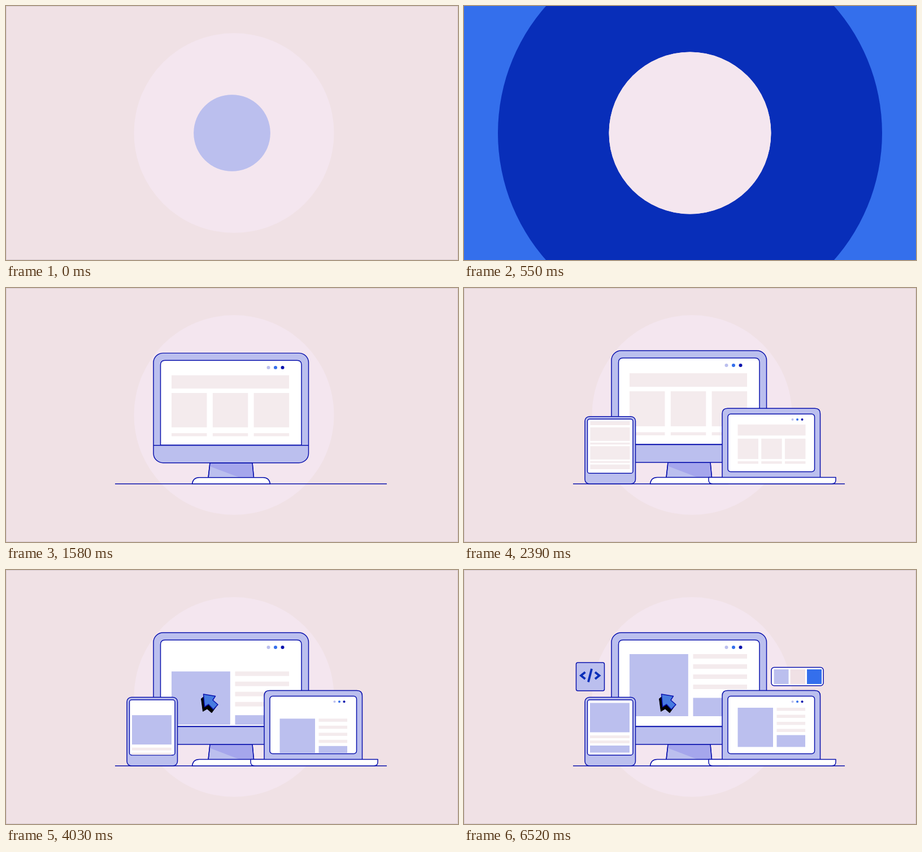
An HTML page for the animation above (6.55 s loop, 800x450 px).

```html
<!DOCTYPE html>
<html lang="en">
<head>
<meta charset="utf-8">
<title>Responsive design</title>
<style>
  html, body { margin: 0; width: 100%; height: 100%; overflow: hidden; background: #f0e1e5; }
  svg { display: block; width: 100vw; height: 100vh; }
  .line { stroke: #0a12ad; stroke-width: 1.5; stroke-linejoin: round; }
  .lilac { fill: #bbbfee; }
  .blue { fill: #346fec; }
  .navy { fill: #0a12ad; }
  .white { fill: #fff; }
  .wire { fill: #f4ebed; }
  .pink { fill: #f0e1e5; }
  .none { fill: none; }
</style>
</head>
<body>
<svg viewBox="0 0 800 450" xmlns="http://www.w3.org/2000/svg">
  <defs>
    <g id="backdrop">
      <rect class="pink" width="800" height="450"/>
      <rect x=".5" y=".5" width="799" height="449" fill="none" stroke="#d9cbd0"/>
      <circle cx="403.5" cy="225" r="177" fill="#f4e6ef"/>
    </g>
    <clipPath id="iris"><circle id="irisCircle" cx="400" cy="225"/></clipPath>
    <clipPath id="monitorClip"><rect x="274" y="125" width="248.500" height="149"/></clipPath>
    <clipPath id="laptopClip"><rect x="468" y="224" width="152" height="101" rx="4"/></clipPath>
    <clipPath id="phoneClip"><rect x="219" y="231" width="79.500" height="96.500" rx="3"/></clipPath>
  </defs>

  <use href="#backdrop"/>
  <circle class="wave lilac" cx="400" cy="225"/>
  <circle class="wave blue" cx="400" cy="225"/>
  <circle class="wave" cx="400" cy="225" fill="#082eb9"/>

  <g clip-path="url(#iris)">
    <use href="#backdrop"/>
    <path id="ground" class="line"/>

    <g id="code">
      <rect class="line lilac" x="198.500" y="164" width="50" height="50" rx="3"/>
      <path d="M214.500 181L207 187L214.500 193M232 181L239.500 187L232 193M226 175L220 198.500"
        fill="none" stroke="#082eb9" stroke-width="3.800"/>
    </g>

    <g id="palette">
      <rect class="line white" x="544" y="172.500" width="92" height="32.500" rx="5"/>
      <rect class="lilac" x="548.500" y="176" width="26" height="26"/>
      <rect class="pink" x="577.500" y="176" width="26.500" height="26"/>
      <rect class="blue" x="607" y="176" width="26" height="26"/>
    </g>

    <g id="monitor">
      <path class="line lilac" d="M361 309H436L438.500 336H358Z"/>
      <path d="M361 309.700H435.500L438 335H412L361 315.500Z" fill="#a5a6ec"/>
      <path class="line none" d="M361 309H436L438.500 336H358Z"/>
      <path class="line white" d="M329.500 347Q331 335.500 342 335.500H455Q466 335.500 467.500 347Z"/>
      <rect class="line lilac" x="261" y="111" width="274.500" height="198" rx="17"/>
      <path class="line white" d="M273.500 277V132Q273.500 124 281.500 124H515Q523 124 523 132V277Z"/>
      <path class="line" d="M261 277.500H535.500"/>
      <g class="screen" clip-path="url(#monitorClip)"><g class="before"></g><g class="after"></g></g>
      <circle class="lilac" cx="464.500" cy="137" r="3"/>
      <circle class="blue" cx="477" cy="137" r="3"/>
      <circle class="navy" cx="489.500" cy="137" r="3"/>
    </g>

    <g id="laptop">
      <path class="line lilac" d="M457 336V223Q457 213.500 466.500 213.500H621Q630.500 213.500 630.500 223V336Z"/>
      <rect class="line white" x="467" y="223.500" width="153.500" height="102" rx="5"/>
      <path class="line white" d="M433 335.500H658V340Q658 347 651 347H440Q433 347 433 340Z"/>
      <g class="screen" clip-path="url(#laptopClip)"><g class="before"></g><g class="after"></g></g>
      <circle class="lilac" cx="581.500" cy="233.300" r="2"/>
      <circle class="blue" cx="590" cy="233.300" r="2"/>
      <circle class="navy" cx="598.500" cy="233.300" r="2"/>
    </g>

    <g id="phone">
      <rect class="line lilac" x="214" y="225.500" width="89.500" height="121.500" rx="8"/>
      <rect class="line white" x="218.500" y="230" width="80.500" height="98" rx="4"/>
      <g class="screen" clip-path="url(#phoneClip)"><g class="before"></g><g class="after"></g></g>
    </g>

    <g id="cursor">
      <path id="shadow" d="M345.500 228L351 224L372 242L364 253L356 246L348.500 250.500Z"
        fill="#000" stroke="#000" stroke-linejoin="round"/>
      <path id="arrow" class="line" fill="#477be0"
        d="M349.500 220L370.500 223.500L366 230.500L375 238.500L367 247L358.500 238L351.500 242.500Z"/>
    </g>
  </g>
</svg>

<script>
const LOOP = 6550;
const byId = id => document.getElementById(id);
const clamp = (v, lo = 0, hi = 1) => Math.min(hi, Math.max(lo, v));
const progress = (t, start, length) => clamp((t - start) / length);
const inOut = (p, n) => p < .5 ? 2 ** (n - 1) * p ** n : 1 - (2 - 2 * p) ** n / 2;
const spring = (t, start, decay = 8, speed = 12) => {
  const age = Math.max(0, t - start) / 1000;
  return 1 - Math.exp(-decay * age) * Math.cos(speed * age);
};
const move = (node, x, y) => node.setAttribute('transform', `translate(${x} ${y})`);
const show = (node, on) => node.setAttribute('visibility', on ? 'visible' : 'hidden');

function box(parent, kind, x1, y1, x2, y2) {
  const rect = document.createElementNS('http://www.w3.org/2000/svg', 'rect');
  const attrs = { class: kind, x: x1, y: y1, width: x2 - x1, height: y2 - y1 };
  for (const name in attrs) rect.setAttribute(name, attrs[name]);
  parent.append(rect);
}

// Wide header above three cards, each with a caption bar.
function wireframe(parent, left, right, card, gap, header, cards, captions) {
  box(parent, 'wire', left, header[0], right, header[1]);
  for (let i = 0; i < 3; i++) {
    const x = left + i * (card + gap);
    box(parent, 'wire', x, cards[0], x + card, cards[1]);
    box(parent, 'wire', x, captions[0], x + card, captions[1]);
  }
}

// Large picture on the left; text lines and a button on the right.
function article(parent, left, split, column, right, top, bottom, pitch, thick, button) {
  box(parent, 'lilac', left, top, split, bottom);
  for (let i = 0; i < 4; i++) {
    const y = top + i * pitch;
    box(parent, 'wire', column, y, right, y + thick);
  }
  box(parent, 'lilac', column, button, right, bottom);
}

function device(id, x, start, scroll) {
  const node = byId(id);
  return { node, x, start, scroll,
    before: node.querySelector('.before'), after: node.querySelector('.after') };
}

const devices = [
  device('monitor', 398, 1100, 170),
  device('laptop', 545, 1600, 107),
  device('phone', 258.75, 1910, 120)
];
const [monitor, laptop, phone] = devices;

wireframe(monitor.before, 293, 501, 62.5, 10.3, [151, 175], [183, 245], [255.5, 261]);
wireframe(laptop.before, 484.5, 604.5, 36.5, 5.2, [242, 261.5], [267, 303], [307, 311.5]);
for (const [y1, y2] of [[234, 241], [245, 269.5], [272.5, 276], [279, 303], [306, 309], [312, 320.5]])
  box(phone.before, 'wire', 223.5, y1, 293.5, y2);

article(monitor.after, 293, 396.8, 405.5, 501, 149, 259, 18, 8, 226.5);
article(laptop.after, 484.5, 547, 553.5, 604, 244, 313.5, 12.5, 5.5, 292.5);
box(phone.after, 'lilac', 223, 235.5, 293, 287.5);
box(phone.after, 'wire', 223, 293, 293, 298);
box(phone.after, 'wire', 223, 302, 293, 307);
box(phone.after, 'lilac', 223, 311, 293, 323.5);

const waves = [...document.querySelectorAll('.wave'), byId('irisCircle')];
const waveStart = i => -33 + 167 * i - (i === waves.length - 1 ? 11 : 0);

// Each wave pops in small, then widens steadily until it covers the stage.
function waveRadius(age) {
  return age > 5 ? Math.min(480, 25 + 1.26 * age) : 0;
}

function drawDevice({ node, x, start, scroll, before, after }, t) {
  const grow = Math.max(0, spring(t, start));
  const widen = inOut(progress(t, start, 180), 2);
  show(node, t > start);
  node.setAttribute('transform',
    `translate(${x} 347) scale(${widen} ${grow}) translate(${-x} -347)`);
  const appear = progress(t, start + 150, 270);
  const scrolled = inOut(progress(t, 3400, 980), 3);
  before.setAttribute('opacity', appear);
  move(before, 0, 12 * (1 - appear) ** 2 - scroll * scrolled);
  move(after, 0, scroll * (1 - scrolled));
}

function drawCursor(t) {
  const p = progress(t, 2500, 550);
  const press = Math.sin(Math.PI * progress(t, 3180, 260));
  show(byId('cursor'), t > 2500);
  move(byId('cursor'), 0, 260 * (1 - p) ** 2);
  move(byId('arrow'), -3.5 * press, 6 * press);
}

function drawExtras(t) {
  const codeStart = 4800;
  const codeAge = Math.max(0, t - codeStart) / 1000;
  const size = Math.max(0, spring(t, codeStart, 7, 13));
  const tilt = -35 * Math.exp(-4.6 * codeAge);
  show(byId('code'), t > codeStart);
  byId('code').setAttribute('transform',
    `translate(223.5 189) rotate(${tilt}) scale(${size}) translate(-223.5 -189)`);

  const slideStart = 5000;
  const slide = 130 * (1 - spring(t, slideStart, 6.5, 4.9));
  show(byId('palette'), t > slideStart);
  byId('palette').setAttribute('opacity', progress(t, slideStart, 120));
  move(byId('palette'), slide, 0);
}

function draw(t) {
  waves.forEach((circle, i) => circle.setAttribute('r', waveRadius(t - waveStart(i))));
  const half = 240.5 * inOut(progress(t, 701, 390), 2);
  byId('ground').setAttribute('d', `M${433.5 - half} 347H${433.5 + half}`);
  show(byId('ground'), half > 0);
  for (const item of devices) drawDevice(item, t);
  drawCursor(t);
  drawExtras(t);
}

const origin = performance.now();
function tick() {
  draw((performance.now() - origin) % LOOP);
  requestAnimationFrame(tick);
}
draw(0);
requestAnimationFrame(tick);
</script>
</body>
</html>
```
